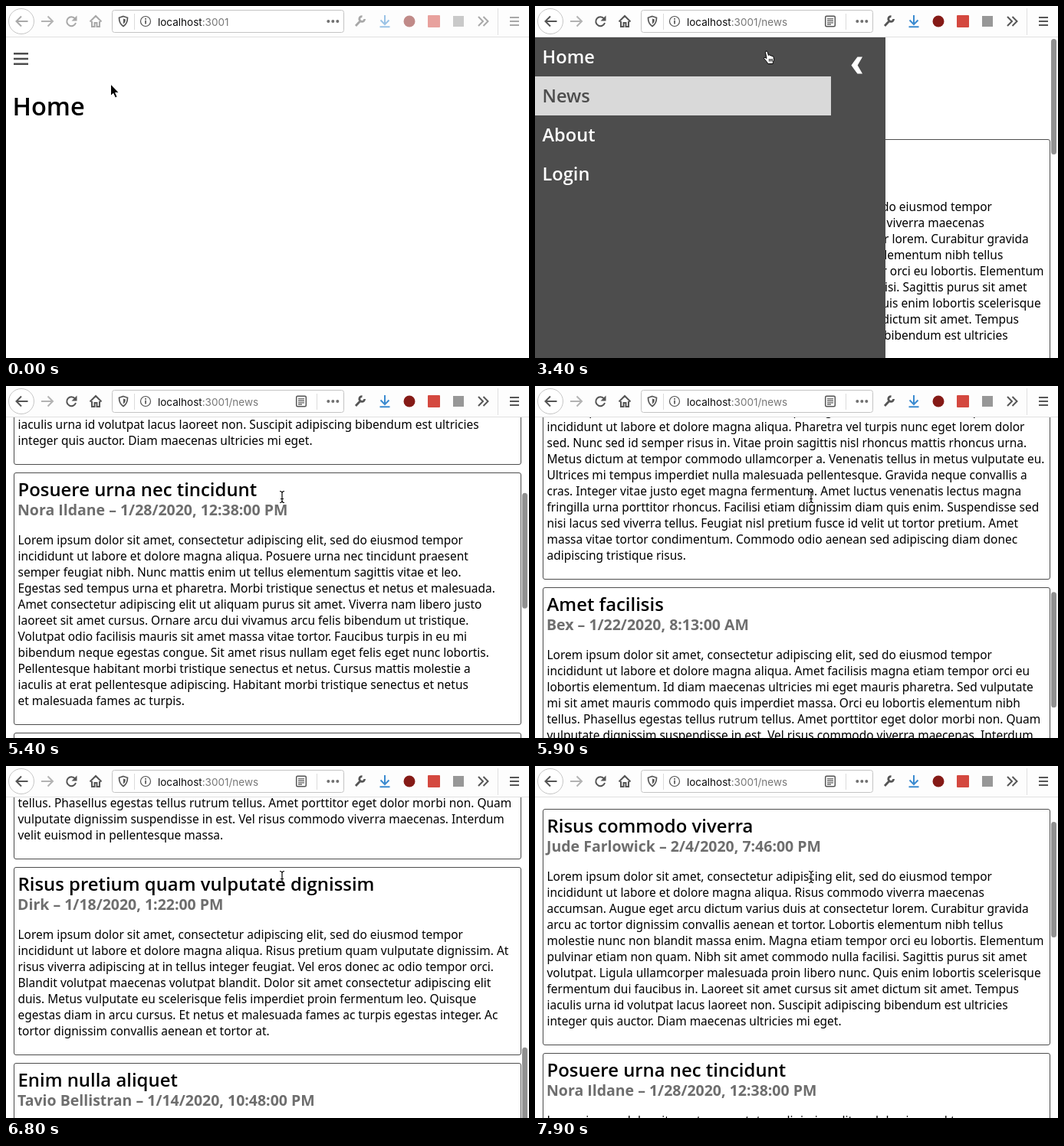
An HTML page for the animation above (8 s loop, 682 px wide and 460 px high).

```html
<!DOCTYPE html>
<html lang="en">
<head>
<meta charset="utf-8">
<title>Side menu demo</title>
<style>
html, body { margin: 0; width: 100%; height: 100%; overflow: hidden; background: #fff; }
#stage { position: relative; width: 682px; height: 460px; overflow: hidden; background: #fff; }
#stage div, #stage svg, h1, h2, h3, article, article p { position: absolute; left: 0; top: 0; margin: 0; white-space: nowrap; }
.ink { fill: none; stroke: #555; stroke-width: 2; }
.url { font: 13.5px Inter, sans-serif; fill: #0c0c0d; }
.url .dim { fill: #777; }
#stage #view { top: 41px; width: 682px; height: 419px; overflow: hidden; }
#stage #page { top: -41px; width: 682px; }
h1, h2, h3, .row { font-family: "Open Sans", sans-serif; font-weight: 600; color: #000; }
#stage h1 { left: 8.5px; top: 111.4px; font-size: 32.6px; line-height: 40px; }
#stage article { left: 10px; width: 660px; border: 1px solid #4d4d4d; border-radius: 3px; }
#stage h2 { left: 4.5px; top: 6px; font-size: 23.9px; line-height: 30px; }
#stage h3 { left: 4px; top: 35.5px; font-size: 19.5px; line-height: 24px; font-weight: 700; color: #6e6e6e; }
#stage article p { left: 4.5px; top: 76.5px; font: 15.475px/21px "Noto Sans", sans-serif; color: #000; white-space: pre; }
#stage #thumb { left: 673px; top: 2px; width: 7px; height: 151px; border-radius: 4px; background: #919191; }
#drawer { height: 419px; overflow: hidden; background: #4d4d4d; }
#stage .row { height: 51px; width: max(20px, calc(100% - 71px)); overflow: hidden;
  font-size: 23.6px; line-height: 51px; text-indent: 9.5px; color: #fff; }
#stage .row.on { background: #d9d9d9; color: #4d4d4d; }
#stage #drawer svg { left: auto; right: 0; }
</style>
</head>
<body>
<div id="stage">
  <svg width="682" height="41">
    <path fill="#fdfdfd" d="M0 0h682v40H0z"/>
    <path fill="#e0e0e1" d="M0 40h682v1H0zM641 3h1v35h-1z"/>
    <circle cx="20" cy="20" r="16.5" fill="#fff" stroke="#c6c6c6"/>
    <rect x="138.5" y="5.5" width="302" height="29" rx="3" fill="#fff" stroke="#c4c4c4"/>
    <path class="ink" style="stroke:#b3b3b3" d="M46 20h14M54.5 13.5L61 20l-6.5 6.5"/>
    <g id="icons">
      <path class="ink" d="M28.5 20H13M20 13.5L13.5 20l6.5 6.5"/>
      <path class="ink" d="M90 16.5A6 6 0 1 0 91 22"/>
      <path fill="#555" d="M92.5 12.5v7h-7z"/>
      <path class="ink" d="M109.5 20.5L117 13l7.5 7.5M112 20v7h3.5v-5h3v5h3.5v-7"/>
      <path class="ink" style="stroke-width:2.8" d="M456 26l6-6.5M464.5 13.6A3.4 3.4 0 1 0 467.6 17"/>
      <path class="ink" style="stroke:#3b8bd0" d="M494 12v12M488.5 18.5l5.5 5.5 5.5-5.5M487.5 27.2h13"/>
      <circle cx="526" cy="20" r="7.5" fill="#851a16"/>
      <rect x="550" y="12" width="16" height="16" rx="1" fill="#d4483f"/>
      <rect x="583" y="13" width="14" height="14" fill="#979797"/>
      <path class="ink" d="M616 14l6 6-6 6M622.5 14l6 6-6 6"/>
      <path class="ink" d="M657 15h12M657 20h12M657 25h12"/>
    </g>
    <path class="ink" style="stroke-width:1.7" d="M153 13.5l5.5 1.8c0 5-1 8.5-5.5 11.2c-4.5-2.7-5.5-6.2-5.5-11.2z"/>
    <path fill="#555" d="M153 16.5l2.8 1c0 3-.6 4.5-2.8 6z"/>
    <path fill="#dcdcdc" d="M167 10h1v21h-1z"/>
    <circle class="ink" style="stroke-width:1.2" cx="182" cy="20" r="6.5"/>
    <path fill="#555" d="M181.2 16h1.7v1.7h-1.7zM181.2 18.8h1.7v4.8h-1.7z"/>
    <text class="url" x="198" y="25.5">localhost<tspan class="dim">:3001</tspan><tspan class="dim news">/news</tspan></text>
    <g class="news">
      <rect class="ink" style="stroke-width:1.5" x="378.7" y="13.2" width="12.6" height="13.6" rx="1.5"/>
      <path class="ink" style="stroke-width:1.2" d="M381 16.8h8M381 19.3h8M381 21.8h8M381 24.2h5"/>
      <path fill="#dcdcdc" d="M405 10h1v21h-1z"/>
    </g>
    <g fill="#707070"><circle cx="420.3" cy="20" r="2"/><circle cx="426.3" cy="20" r="2"/><circle cx="432.3" cy="20" r="2"/></g>
  </svg>

  <div id="view">
    <div id="page">
      <svg width="40" height="90"><path fill="#4d4d4d" d="M10 61h19v2.6H10zM10 67.700h19v2.6H10zM10 74.4h19v2.6H10z"/></svg>
      <h1 id="heading"></h1>
      <div id="posts" class="news"></div>
    </div>
    <div id="thumb" class="news"></div>
    <div id="drawer">
      <svg width="71" height="70"><path fill="#fff" d="M34.5 25.5H41L34.7 36.5 41 47.5h-6.5Q31 43 26.5 36.5Q31 30 34.5 25.5z"/></svg>
    </div>
  </div>

  <svg id="cursor" width="24" height="24" overflow="visible">
    <path id="arrow" stroke="#fff" d="M-.5-1v15.5l3.4-3.2 2.5 5.6 2.7-1.2-2.5-5.4h4.7z"/>
    <g id="hand" fill="#fff" stroke="#000" stroke-linejoin="round">
      <path d="M-1.5 1.5q0-1.8 1.5-1.5q1.2.3 1.5 1.8l.9 3.7q.4-1.2 2-.5l.5.9q1-.7 2.2.6q1.8-.5 2.1 1.5l.3 3.5-1.2 3v2H1.7L.5 14.2-3.4 9.7q-.6-1.7 1.6-1.2L0 9.500z"/>
      <path d="M3.5 10v3.5M5.5 10v3.5M7.3 10v3.5"/>
    </g>
    <g id="beam" fill="none">
      <path stroke="#fff" stroke-width="2.6" d="M0-6V6"/>
      <path stroke="#000" stroke-width="1.2" d="M-3-7.5q3 0 3 2.5q0-2.5 3-2.5M0-5V5M-3 7.5q3 0 3-2.5q0 2.5 3 2.5M-2 2.5h4"/>
    </g>
  </svg>
</div>

<script>
const LOOP = 8000, STEP = 100;
const FOCUS = 300, NAVIGATE = 2600;
const $ = id => document.getElementById(id);
const make = (tag, parent, text = "") => {
  const el = parent.appendChild(document.createElement(tag));
  el.textContent = text;
  return el;
};

const intro = `Lorem ipsum dolor sit amet, consectetur adipiscing elit, sed do eiusmod tempor
incididunt ut labore et dolore magna aliqua. `;
const posts = [
["Risus commodo viverra", "Jude Farlowick – 2/4/2020, 7:46:00 PM", `Risus commodo viverra maecenas
accumsan. Augue eget arcu dictum varius duis at consectetur lorem. Curabitur gravida
arcu ac tortor dignissim convallis aenean et tortor. Lobortis elementum nibh tellus
molestie nunc non blandit massa enim. Magna etiam tempor orci eu lobortis. Elementum
pulvinar etiam non quam. Nibh sit amet commodo nulla facilisi. Sagittis purus sit amet
volutpat. Ligula ullamcorper malesuada proin libero nunc. Quis enim lobortis scelerisque
fermentum dui faucibus in. Laoreet sit amet cursus sit amet dictum sit amet. Tempus
iaculis urna id volutpat lacus laoreet non. Suscipit adipiscing bibendum est ultricies
integer quis auctor. Diam maecenas ultricies mi eget.`],
["Posuere urna nec tincidunt", "Nora Ildane – 1/28/2020, 12:38:00 PM", `Posuere urna nec tincidunt praesent
semper feugiat nibh. Nunc mattis enim ut tellus elementum sagittis vitae et leo.
Egestas sed tempus urna et pharetra. Morbi tristique senectus et netus et malesuada.
Amet consectetur adipiscing elit ut aliquam purus sit amet. Viverra nam libero justo
laoreet sit amet cursus. Ornare arcu dui vivamus arcu felis bibendum ut tristique.
Volutpat odio facilisis mauris sit amet massa vitae tortor. Faucibus turpis in eu mi
bibendum neque egestas congue. Sit amet risus nullam eget felis eget nunc lobortis.
Pellentesque habitant morbi tristique senectus et netus. Cursus mattis molestie a
iaculis at erat pellentesque adipiscing. Habitant morbi tristique senectus et netus
et malesuada fames ac turpis.`],
["Pharetra vel turpis", "Marlo Quent – 1/25/2020, 4:05:00 PM", `Pharetra vel turpis nunc eget lorem dolor
sed. Nunc sed id semper risus in. Vitae proin sagittis nisl rhoncus mattis rhoncus urna.
Metus dictum at tempor commodo ullamcorper a. Venenatis tellus in metus vulputate eu.
Ultrices mi tempus imperdiet nulla malesuada pellentesque. Gravida neque convallis a
cras. Integer vitae justo eget magna fermentum. Amet luctus venenatis lectus magna
fringilla urna porttitor rhoncus. Facilisi etiam dignissim diam quis enim. Suspendisse sed
nisi lacus sed viverra tellus. Feugiat nisl pretium fusce id velit ut tortor pretium. Amet
massa vitae tortor condimentum. Commodo odio aenean sed adipiscing diam donec
adipiscing tristique risus.`],
["Amet facilisis", "Bex – 1/22/2020, 8:13:00 AM", `Amet facilisis magna etiam tempor orci eu
lobortis elementum. Id diam maecenas ultricies mi eget mauris pharetra. Sed vulputate
mi sit amet mauris commodo quis imperdiet massa. Orci eu lobortis elementum nibh
tellus. Phasellus egestas tellus rutrum tellus. Amet porttitor eget dolor morbi non. Quam
vulputate dignissim suspendisse in est. Vel risus commodo viverra maecenas. Interdum
velit euismod in pellentesque massa.`],
["Risus pretium quam vulputate dignissim", "Dirk – 1/18/2020, 1:22:00 PM", `Risus pretium quam vulputate dignissim. At
risus viverra adipiscing at in tellus integer feugiat. Vel eros donec ac odio tempor orci.
Blandit volutpat maecenas volutpat blandit. Dolor sit amet consectetur adipiscing elit
duis. Metus vulputate eu scelerisque felis imperdiet proin fermentum leo. Quisque
egestas diam in arcu cursus. Et netus et malesuada fames ac turpis egestas integer. Ac
tortor dignissim convallis aenean et tortor at.`],
["Enim nulla aliquet", "Tavio Bellistran – 1/14/2020, 10:48:00 PM", `Enim nulla aliquet porttitor lacus luctus
accumsan tortor posuere. Eget nulla facilisi etiam dignissim diam quis enim lobortis.
Viverra justo nec ultrices dui sapien eget mi proin sed.`]];

let postTop = 174;
for (const [title, byline, rest] of posts) {
  const box = make("article", $("posts")), text = intro + rest;
  const height = 99 + 21 * text.split("\n").length;
  box.style.cssText = `top:${postTop}px;height:${height - 2}px`;
  make("h2", box, title);
  make("h3", box, byline);
  make("p", box, text);
  postTop += height + 10;
}

const rows = ["Home", "News", "About", "Login"].map((name, i) => {
  const row = make("div", $("drawer"), name);
  row.style.top = 51 * i + "px";
  return row;
});

// Monotone cubic through [time, value] knots, held flat outside them.
function track(knots) {
  const n = knots.length - 1;
  const rise = i => (knots[i + 1][1] - knots[i][1]) / (knots[i + 1][0] - knots[i][0]);
  const slope = i => {
    if (i === 0 || i === n) return 0;
    const a = rise(i - 1), b = rise(i);
    return a * b > 0 ? 2 * a * b / (a + b) : 0;
  };
  return t => {
    if (t <= knots[0][0]) return knots[0][1];
    if (t >= knots[n][0]) return knots[n][1];
    const i = knots.findIndex(k => k[0] > t) - 1;
    const [t0, a] = knots[i], [t1, b] = knots[i + 1];
    const d = t1 - t0, u = (t - t0) / d;
    return a + (b - a) * u * u * (3 - 2 * u)
      + d * u * (1 - u) * ((1 - u) * slope(i) - u * slope(i + 1));
  };
}

const path = [[0, 137, 103], [400, 128, 100], [900, 70, 84], [1500, 21, 65], [1850, 21, 65],
  [2400, 90, 118], [2700, 90, 118], [3400, 302, 59], [3850, 420, 76], [4150, 420, 76], [4600, 360, 145]];
const cursorX = track(path.map(p => [p[0], p[1]]));
const cursorY = track(path.map(p => [p[0], p[2]]));
const drawerWidth = track([[1688, 0], [1815, 187], [1940, 366], [2065, 439], [2190, 457],
  [4000, 457], [4125, 270], [4250, 91], [4375, 18], [4500, 0]]);
const scroll = track([[4900, 0], [5400, 380], [5900, 889], [6450, 1340], [6800, 1276],
  [7350, 620], [7900, 118], [8150, 0]]);

const show = (el, on) => { el.style.display = on ? "" : "none"; };

function draw(t) {
  const news = t >= NAVIGATE, y = Math.round(scroll(t));
  $("icons").style.opacity = t < FOCUS ? 0.5 : 1;
  document.querySelectorAll(".news").forEach(el => show(el, news));
  $("heading").textContent = news ? "News" : "Home";
  $("page").style.transform = `translateY(${-y}px)`;
  $("thumb").style.transform = `translateY(${y / 3.93}px)`;

  $("drawer").style.width = Math.round(drawerWidth(t)) + "px";
  rows.forEach((row, i) => { row.className = i === Number(news) ? "row on" : "row"; });

  const kind = t >= 5000 ? "beam" : t >= 1400 && t < 4200 ? "hand" : "arrow";
  for (const id of ["arrow", "hand", "beam"]) show($(id), id === kind);
  $("cursor").style.transform = `translate(${cursorX(t)}px, ${cursorY(t)}px)`;
}

const start = performance.now();
function tick() {
  const t = (performance.now() - start) % LOOP;
  draw(Math.floor(t / STEP) * STEP);
  requestAnimationFrame(tick);
}
tick();
</script>
</body>
</html>
```
